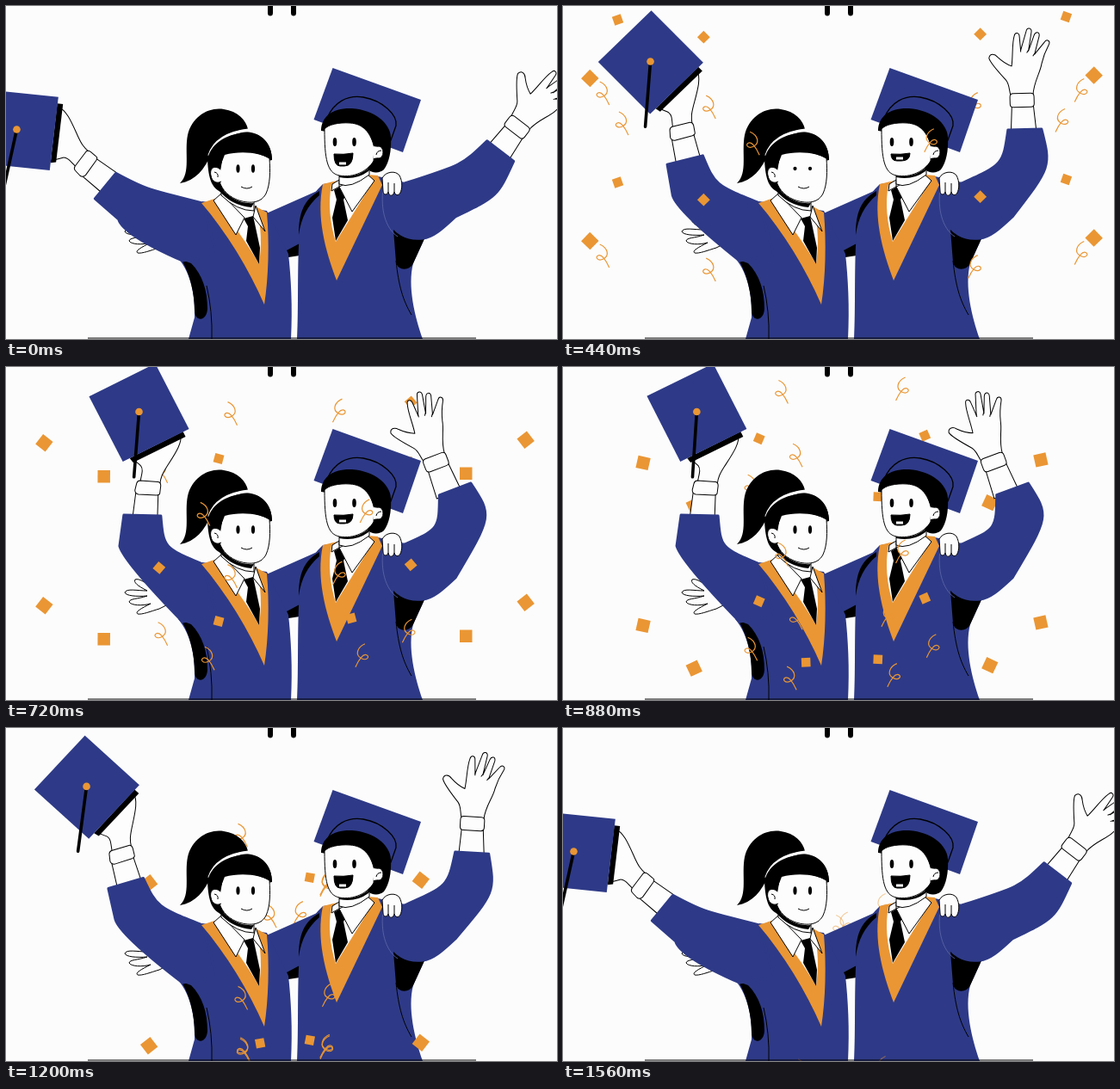
These frames come from a looping animation (640x387 px, 1.6 s). An HTML page with a canvas:

```html
<!DOCTYPE html>
<html>
<head>
<meta charset="utf-8">
<title>Graduates</title>
<style>
  html, body { margin: 0; height: 100%; overflow: hidden; background: #fcfcfc; }
  canvas { display: block; }
</style>
</head>
<body>
<canvas id="stage" width="640" height="387"></canvas>
<script>
const ctx = document.getElementById('stage').getContext('2d');
const LOOP = 1600, BLUE = '#2e3a87', ORANGE = '#ea9634', BLACK = '#000', WHITE = '#fdfdfd';
const rad = deg => deg * Math.PI / 180;

function shape(d, fill, stroke, width = 1) {
  const path = new Path2D(d);
  if (fill) { ctx.fillStyle = fill; ctx.fill(path); }
  if (stroke) { ctx.strokeStyle = stroke; ctx.lineWidth = width; ctx.stroke(path); }
}

function oval(x, y, rx, ry, fill, stroke) {
  ctx.beginPath();
  ctx.ellipse(x, y, rx, ry, 0, 0, 7);
  ctx.fillStyle = fill;
  ctx.fill();
  if (stroke) { ctx.strokeStyle = stroke; ctx.lineWidth = 1; ctx.stroke(); }
}

// Smooth curve through rows of [time, value, ...]
function follow(keys, t) {
  const last = keys.length - 1;
  let i = 0;
  while (i < last - 1 && t > keys[i + 1][0]) i++;
  const a = keys[i], b = keys[i + 1], span = b[0] - a[0];
  const u = Math.min(1, Math.max(0, (t - a[0]) / span));
  const slope = (j, k) => {
    const from = keys[Math.max(0, j - 1)], to = keys[Math.min(last, j + 1)];
    return (to[k] - from[k]) / (to[0] - from[0]) * span;
  };
  return a.slice(1).map((v, n) => {
    const k = n + 1, w = b[k];
    return v + u * slope(i, k)
      + u * u * (3 * (w - v) - 2 * slope(i, k) - slope(i + 1, k))
      + u * u * u * (2 * (v - w) + slope(i, k) + slope(i + 1, k));
  });
}

function turn([x, y], [cx, cy], deg) {
  const c = Math.cos(rad(deg)), s = Math.sin(rad(deg));
  return [cx + (x - cx) * c - (y - cy) * s, cy + (x - cx) * s + (y - cy) * c];
}

function turned(pivot, deg, draw) {
  ctx.save();
  ctx.translate(...pivot);
  ctx.rotate(rad(deg));
  ctx.translate(-pivot[0], -pivot[1]);
  draw();
  ctx.restore();
}

// Confetti: [time, x, y] paths of the left burst; the right one is mirrored
const confetti = [
  { size: 14.5, spin: -0.158, phase: 114, fade: 1000, path: [[280, -20, 77], [360, 6, 79], [440, 31, 84],
    [600, 82, 104], [880, 152, 161], [960, 166, 180], [1080, 184, 208]] },
  { size: 10.5, spin: -0.107, phase: 2, fade: 1000, path: [[80, -60, 60], [160, 23, 28], [200, 63, 16],
    [360, 131, 24], [440, 163, 36], [600, 217, 72], [880, 282, 154], [960, 295, 177], [1080, 311, 212]] },
  { fade: 1260, path: [[100, -80, 118], [160, 2, 108], [200, 46, 101], [360, 149, 111], [440, 170, 117],
    [600, 210, 133], [880, 264, 172], [1200, 307, 218], [1380, 328, 236]] },
  { fade: 1260, path: [[100, -70, -20], [160, 8, -39], [200, 68, -53], [360, 198, -50], [440, 221, -30],
    [600, 250, 16], [880, 271, 102], [1200, 276, 185], [1380, 278, 220]] }
];
const CURL = 'M-4,-13C5,-9 8,0 0,4C-6,7 -10,2 -6,0C-2,-2 3,5 7,14';

function drawConfetti(t, drop) {
  for (const { size, spin, phase, fade, path } of confetti)
    for (const delay of [0, 240]) {
      const age = t - delay, end = path[path.length - 1][0];
      if (age < path[0][0] || age > end) continue;
      for (const mirrored of [0, 1]) {
        ctx.save();
        ctx.globalAlpha = Math.min(1, (end - age) / (end - fade));
        ctx.translate(648 * mirrored, drop - 3.5 * mirrored);
        ctx.scale(mirrored ? -1 : 1, 1);
        ctx.translate(...follow(path, age));
        if (size) {
          ctx.rotate(rad(phase + spin * age));
          ctx.fillStyle = ORANGE;
          ctx.fillRect(-size / 2, -size / 2, size, size);
        } else shape(CURL, null, ORANGE, 1.2);
        ctx.restore();
      }
    }
}

// 0 = arm spread, 1 = arm up
function armLift(t, peak, reach, power) {
  const u = Math.min(1, Math.abs(t - peak) / reach);
  return 1.03 * (1 - u ** power);
}

const TASSEL = [[0, 12.5], [160, 2.2], [440, 4.5], [600, 5.2], [880, 3.7], [1200, 7.5], [1560, 12.5], [1600, 12.5]];
const MOUTH = [[0, 15], [160, 11.5], [440, 9], [600, 9.5], [880, 13], [1200, 15], [1600, 15]];

function drawBoy(t) {
  const lift = armLift(t, 795, 710, 1.5);

  // Right arm around the girl, its hand showing behind her
  shape('M190,275L178,281C168,284 158,288 153,287C150,285 154,282 168,275C158,278 145,277 143,273C144,269 152,270 164,266C152,267 139,266 138,262C140,257 152,260 164,260C152,254 148,250 150,247C155,245 164,252 172,258Z', WHITE, BLACK);
  shape('M298,243L368,212L352,290H328Z', BLUE);
  shape('M326,284L341,276V290L328,292Z', BLACK);

  // Board and body
  shape('M379.5,72L482,109L461,170L357.5,132Z', BLUE);
  shape('M368,207L432,198L463,205L490,262L473,299C466,325 475,362 484,387H338C340,350 338,300 341,262C343,240 352,222 368,207Z', BLUE);
  shape('M364,215C346,225 340,240 340,266C343,246 350,232 364,220Z', BLACK);
  shape('M450,260L488,266L473,299C469,308 455,308 453,298Z', BLACK);
  shape('M453,296C456,325 461,342 471,359', null, BLACK);

  // Raised arm
  const pivot = [519.5, 210.5], deg = 58.4 * (0.64 - lift), nudge = Math.max(0, lift - 0.64) * 25;
  turned(pivot, deg, () => {
    shape('M524,116L522,150H552L549,116Z', WHITE, BLACK);
    shape('M523,104C521,97 522,91 518,86C511,78 500,65 499,60C500,54 506,55 509,59C514,64 520,68 525,70C527,58 526,44 529,35C530,30 535,31 535,36L536,52L543,30C544,25 550,26 549,31L545,53L552,35C554,30 559,31 558,36L552,57L564,43C567,39 571,42 569,46C565,53 562,60 560,68C558,79 550,89 549,104Z', WHITE, BLACK);
    shape('M536,51V54M545,52L543,55M552,56L550,59', null, BLACK);
    shape('M526,102H546Q550,102 550,106V114Q550,118 546,118H526Q522,118 522,114V106Q522,102 526,102Z', WHITE, BLACK);
  });
  const [l, r, e, inner] = [[518, 144], [557, 144], [567, 188], [512, 184]].map(p => turn(p, pivot, deg));
  for (const p of [l, r, e]) p[0] += nudge;
  shape(`M${l}L${r}C${e} ${e} 522,245C507,259 496,269 484,270C466,272 452,266 437,240V210L463,206C${inner} ${inner} ${l}Z`, BLUE, BLUE, 3);
  shape('M438,212C435,235 440,258 455,268', null, '#5863a6', 0.9);

  // Shirt, tie and stole
  shape('M368,207L380,204L420,196L432,197L437,208L384,319C371,285 360,245 368,207Z', ORANGE);
  shape('M378,208L386,202L420,196L427,203L383,274C376,252 374,228 378,208Z', WHITE);
  shape('M381,214L388,210L395,219L392,225L397,249L383,273L379,246L384,225Z', BLACK);
  shape('M387,210L419,195L428,203L402,239Z', WHITE, BLACK);
  shape('M387,210L378,215L379,207L387,202Z', WHITE, BLACK);

  // Head and cap
  shape('M387,190V207Q400,213 422,196V180Z', WHITE, BLACK);
  shape('M387,196Q406,202 424,186L421,192Q406,203 387,199Z', BLACK);
  shape('M373,130C381,112 396,103 415,106C438,110 455,127 453,139L447,156Z', BLUE, BLACK, 1.3);
  shape('M366,145C366,128 380,118 402,119C428,121 446,136 447,152C448,168 445,182 439,190C434,195 424,194 421,190L400,150Z', BLACK);
  shape('M370,143C374,138 386,135 400,136C414,137 424,146 428,166L427,180C420,192 404,200 387,197C373,194 370,178 370,143Z', WHITE, BLACK);
  oval(433, 170, 5, 7, WHITE, BLACK);
  shape('M427,163V177L433,176V164Z', WHITE);
  shape('M430,173Q431,168 436,168', null, BLACK);
  oval(382, 158, 2.3, 5, BLACK);
  oval(404.5, 158, 2.3, 5, BLACK);
  const bottom = 171 + follow(MOUTH, t)[0];
  shape(`M381,172Q392,173 403,171Q403,${bottom} 393,${bottom}H388Q381,${bottom} 381,172Z`, BLACK, BLACK, 1);
  shape(`M387,${bottom - 3}H395`, null, WHITE, 3);

  // The girl's hand on his shoulder
  shape('M437,200C441,192 453,191 457,197C461,204 460,213 458,217C456,221 452,220 451,216C450,221 445,222 444,216C442,221 438,219 438,215Z', WHITE, BLACK);
  shape('M451,216V206M444,216V205', null, BLACK);
}

function drawGirl(t) {
  const lift = armLift(t, 805, 725, 1.6);
  shape('M200,293C216,312 220,340 219,362L212,387H331C333,350 331,315 328,288L303,238L228,227Z', BLUE);
  shape('M204,295C214,312 219,335 219,355C220,367 233,367 234,352C234,330 228,312 215,299Z', BLACK);
  shape('M233,325Q240,355 239,387', null, BLACK);

  // Raised arm with the cap
  const pivot = [168, 229], spread = 1 - lift, deg = -57 * spread;
  turned(pivot, deg, () => {
    shape('M151,146L147,176H176L177,147Z', WHITE, BLACK);
    shape('M156,134C158,124 160,119 157,115C152,110 147,108 150,104L203,78C206,88 196,102 187,116C182,124 180,128 179,136Z', WHITE, BLACK);
    shape('M156,132L177,133.5Q180,134 180,138L179,146Q179,149 175,149L154,148Q150,147 150,143L152,135Q153,132 156,132Z', WHITE, BLACK);
    shape('M144,106L206,75L209,81L148,111Z', BLACK);
    shape('M97,34L174,-4L213,72L136,110Z', BLUE);
  });
  const [a, b, e, inner] = [[180, 173], [137, 172], [132, 208], [183, 210]].map(p => turn(p, pivot, deg));
  a[1] += 6 * spread;
  inner[1] += 6 * spread;
  shape(`M${a}L${b}L${e}Q${e[0] + 5},${e[1] + 18} 205,296L245,290L228,229C${inner} ${inner} ${a}Z`, BLUE, BLUE, 3);
  const button = turn([155, 52], pivot, deg);
  ctx.lineCap = 'round';
  turned(button, follow(TASSEL, t)[0], () => shape(`M${button}v76`, null, BLACK, 3.6));
  ctx.lineCap = 'butt';
  oval(...button, 4.3, 4.3, ORANGE);

  // Stole, shirt and tie
  shape('M227,229L242,224L292,234L303,240C306,275 305,315 300,347C282,305 256,263 227,229Z', ORANGE);
  shape('M241,226L250,219L291,235C297,257 297,280 294,300C280,275 262,251 241,226Z', WHITE);
  shape('M276,247L287,244L289,253L295,281L294,300L279,273L281,256Z', BLACK);
  shape('M241,226L250,218L277,246L267,266Z', WHITE, BLACK);
  shape('M287,245L290,232L301,262Z', WHITE, BLACK);

  // Ponytail and head
  shape('M202,206C215,194 207,170 211,150C216,128 236,117 253,120C269,122 279,133 281,143C262,145 246,153 239,170C231,190 220,203 202,206Z', BLACK);
  shape('M250,200V220Q268,238 288,238V225Z', WHITE, BLACK);
  shape('M248,209Q265,231 288,229L285,234Q262,232 248,215Z', BLACK);
  shape('M234,178C234,160 253,147 276,146C297,146 309,160 309,179L262,190L252,217C240,213 235,203 234,178Z', BLACK);
  shape('M236,174C241,158 256,147 283,144', null, WHITE, 3.5);
  shape('M252,172C270,166 290,168 306,177C307,192 307,207 302,218C296,230 281,230 268,225C256,220 249,211 247,200Z', WHITE, BLACK);
  shape('M234,179C237,161 254,149 278,147C298,147 309,161 309,179C297,170 272,168 254,173L247,191Z', BLACK);
  shape('M249,190C242,184 236,189 238,197C239,204 245,207 250,204', WHITE, BLACK);
  shape('M242,193Q247,194 246,199M273,210Q280,214 286,210', null, BLACK);
  const blink = Math.min(1, 0.45 + Math.abs(t - 440) / 150);
  oval(269.5, 189, 2.1, 4.7 * blink, BLACK);
  oval(287, 189, 2.1, 4.7 * blink, BLACK);
}

function frame(now) {
  const t = now % LOOP;
  ctx.lineJoin = 'round';
  ctx.fillStyle = '#fcfcfc';
  ctx.fillRect(0, 0, 640, 387);
  shape('M304,0H310V8Q310,11.5 307,11.5Q304,11.5 304,8ZM331,0H337V8Q337,11.5 334,11.5Q331,11.5 331,8Z', BLACK);
  drawConfetti(t, 0);
  drawBoy(t);
  drawGirl(t);
  drawConfetti(t, 189);
  shape('M95,386H546', null, BLACK, 1.2);
  requestAnimationFrame(() => frame(performance.now()));
}
frame(performance.now());
</script>
</body>
</html>
```
